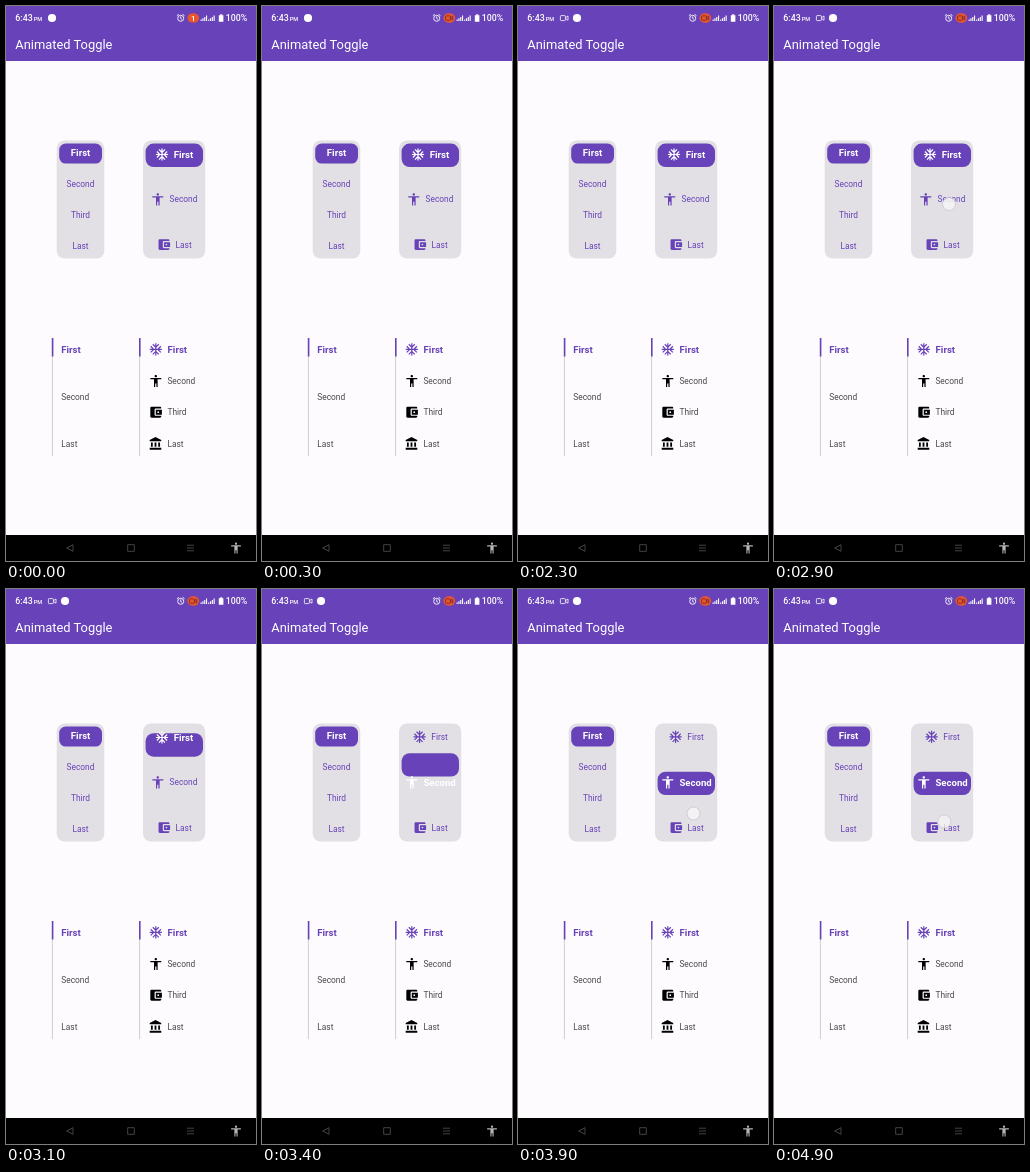
Write an HTML page that moves like this. It is 250 by 555 pixels and loops after 5000 ms.

```html
<!DOCTYPE html>
<html lang="en">
<head>
<meta charset="utf-8">
<title>Animated Toggle</title>
<style>
  html, body { margin: 0; width: 100%; height: 100%; overflow: hidden; background: #fdfbfe; }
  svg { display: block; width: 100%; height: 100%; }
  text { font: 8.4px Roboto, sans-serif; fill: #4a484e; }
  .white { fill: #fff; }
  .purple { fill: #6742b8; }
  .bold { font-size: 9.6px; font-weight: 700; }
  .mid { text-anchor: middle; }
  .status text { font-weight: 500; fill: #fff; }
  .panel { fill: #e2e0e5; }
  .nav { fill: none; stroke: #4b4b4b; stroke-width: .9; }
</style>
</head>
<body>
<svg viewBox="0 0 250 555">
  <defs>
    <symbol id="snow" viewBox="0 0 24 24"><path d="M22 11h-4.17l3.24-3.24-1.41-1.42L15 11h-2V9l4.66-4.66-1.42-1.41L13 6.17V2h-2v4.17L7.76 2.93 6.34 4.34 11 9v2H9L4.34 6.34 2.93 7.76 6.17 11H2v2h4.17l-3.24 3.24 1.41 1.42L9 13h2v2l-4.66 4.66 1.42 1.41L11 17.83V22h2v-4.17l3.24 3.24 1.42-1.41L13 15v-2h2l4.66 4.66 1.41-1.42L17.83 13H22z"/></symbol>
    <symbol id="person" viewBox="0 0 24 24"><path d="M12 2c1.1 0 2 .9 2 2s-.9 2-2 2-2-.9-2-2 .9-2 2-2zm9 7h-6v13h-2v-6h-2v6H9V9H3V7h18v2z"/></symbol>
    <symbol id="wallet" viewBox="0 0 24 24"><path d="M21 18v1c0 1.1-.9 2-2 2H5c-1.11 0-2-.9-2-2V5c0-1.1.89-2 2-2h14c1.1 0 2 .9 2 2v1h-9c-1.11 0-2 .9-2 2v8c0 1.1.89 2 2 2h9zm-9-2h10V8H12v8zm4-2.5c-.83 0-1.5-.67-1.5-1.5s.67-1.5 1.5-1.5 1.5.67 1.5 1.5-.67 1.5-1.5 1.5z"/></symbol>
    <symbol id="bank" viewBox="0 0 24 24"><path d="M4 10v7h3v-7H4zm6 0v7h3v-7h-3zM2 22h19v-3H2v3zm14-12v7h3v-7h-3zm-4.5-9L2 6v2h19V6l-9.5-5z"/></symbol>
    <path id="bars" d="M0 15v-1.5h1.1V15zM1.8 15v-2.8h1.1V15zM3.6 15v-4.1h1.1V15zM5.4 15V9.5h1.1V15z"/>
  </defs>

  <rect width="250" height="555" fill="#fdfbfe"/>
  <rect width="250" height="55" class="purple"/>

  <g class="status">
    <text x="9.3" y="15.3" style="font-size:8.8px">6:43</text>
    <text x="27.8" y="15.3" style="font-size:5.6px">PM</text>
    <g id="camera" fill="none" stroke="#fff" stroke-width=".8">
      <rect x="42.4" y="9.6" width="5" height="5" rx=".8"/>
      <path d="M47.6 11.5L50 10v4.2l-2.4-1.5"/>
    </g>
    <circle id="app" cx="59" cy="12" r="4.1" fill="#fff"/>
    <g fill="none" stroke="#fff" stroke-width=".9">
      <circle cx="174.7" cy="12.3" r="3"/>
      <path d="M174.7 10.5v2l1.3.8M170.9 9.8l1.9-1.6M178.5 9.8l-1.9-1.6"/>
    </g>
    <ellipse cx="187.3" cy="12" rx="5.9" ry="4.8" fill="#e9552f"/>
    <text id="count" class="mid" x="187.3" y="14.8" style="font-size:8px">1</text>
    <g id="record" fill="none" stroke="#6d2b34" stroke-width=".8">
      <rect x="183.6" y="9.9" width="4.8" height="4.4" rx=".7"/>
      <path d="M188.5 11.6l2.2-1.3v3.6l-2.2-1.3"/>
    </g>
    <use href="#bars" x="194.6" fill="#fff"/>
    <use href="#bars" x="202.2" fill="#fff"/>
    <path class="white" d="M214.2 8.2h2v1h1.2v6.6h-4.6V9.2h1.4z"/>
    <text x="219.8" y="15.3" style="font-size:8.8px">100%</text>
  </g>
  <text class="white" x="9.3" y="43" style="font-size:12.9px">Animated Toggle</text>

  <rect class="panel" x="50.7" y="134.5" width="47.6" height="118" rx="8"/>
  <rect class="purple" x="53.2" y="137.6" width="42.8" height="20" rx="6.5"/>
  <text class="white bold mid" x="74.6" y="150.3">First</text>
  <g class="mid">
    <text class="purple" x="74.5" y="181">Second</text>
    <text class="purple" x="74.5" y="212">Third</text>
    <text class="purple" x="74.5" y="243">Last</text>
  </g>

  <rect class="panel" x="137" y="134.5" width="62.2" height="118" rx="8"/>
  <rect id="pill" class="purple" x="139.6" width="57.4" height="23.4" rx="8"/>
  <g id="options"></g>

  <path d="M46.4 332v118M133.6 332v118" stroke="#cfcdd3"/>
  <path d="M46.6 332v18.6M133.8 332v18.6" stroke="#6742b8" stroke-width="1.6"/>
  <text class="purple bold" x="55.3" y="346.8">First</text>
  <text x="55.3" y="393.8">Second</text>
  <text x="55.3" y="441">Last</text>
  <g id="list"></g>

  <circle id="touch" r="6.5" fill="#f5f4f6" stroke="#c6c4c9" stroke-width=".8"/>

  <rect y="529" width="250" height="26"/>
  <path class="nav" d="M67 538.7v6.6l-6.4-3.3zM121.7 538.7h6.6v6.6h-6.6zM181 539.2h7M181 542h7M181 544.8h7"/>
  <use href="#person" x="223.5" y="535.5" width="13" height="13" fill="#b5b5b5"/>
</svg>
<script>
const LOOP = 5000, STEP = 100;
const $ = id => document.getElementById(id);
const clamp = x => Math.max(0, Math.min(1, x));
const ramp = (t, from, to) => clamp((t - from) / (to - from));
const mix = (a, b, k) => a + (b - a) * k;

const item = (icon, label, iconX, iconY, textX, textY, look, fill = look) =>
  `<use href="#${icon}" class="${fill}" x="${iconX - 7.3}" y="${iconY - 7.3}" width="14.6" height="14.6"/>
   <text class="${look}" x="${textX}" y="${textY}">${label}</text>`;

$('list').innerHTML =
  item('snow', 'First', 149.8, 343.3, 161.6, 346.8, 'purple bold') +
  item('person', 'Second', 149.8, 375, 161.4, 378.2, '') +
  item('wallet', 'Third', 149.8, 406.2, 161.4, 409.4, '') +
  item('bank', 'Last', 149.8, 437.6, 161.4, 441, '');

const options = second =>
  (second
    ? item('snow', 'First', 157.6, 147.8, 169.3, 150.8, 'purple') +
      item('person', 'Second', 149.8, 193.4, 161.4, 196.8, 'white bold')
    : item('snow', 'First', 156, 148.5, 167.8, 151.8, 'white bold') +
      item('person', 'Second', 151.8, 193.4, 163.5, 196.4, 'purple')) +
  item('wallet', 'Last', 158, 238.6, 169.5, 241.8, 'purple');

let chosen;
function draw(t) {
  // The recording icon pushes the app icon to the right.
  const slide = ramp(t, 300, 700);
  $('camera').setAttribute('opacity', slide);
  $('app').setAttribute('cx', mix(46, 59, slide));
  $('count').setAttribute('opacity', t < 300 ? 1 : 0);
  $('record').setAttribute('opacity', t < 300 ? 0 : 1);

  const move = ramp(t, 3000, 3680);
  $('pill').setAttribute('y', mix(137.6, 182.7, move));
  const second = move > .5;
  if (second !== chosen) $('options').innerHTML = options(chosen = second);

  const tap = t >= 2500 && t < 3000, drag = t >= 3900;
  const k = ramp(t, 3900, 4400);
  const touch = $('touch');
  touch.setAttribute('cx', drag ? mix(175.5, 170.3, k) : 175);
  touch.setAttribute('cy', drag ? mix(224.5, 232.5, k) : 198);
  touch.setAttribute('opacity', drag ? mix(.95, .75, k) : tap ? .85 : 0);
}

const start = performance.now();
function tick() {
  const t = Math.max(0, performance.now() - start) % LOOP;
  draw(Math.floor(t / STEP) * STEP);
  requestAnimationFrame(tick);
}
tick();
</script>
</body>
</html>
```
